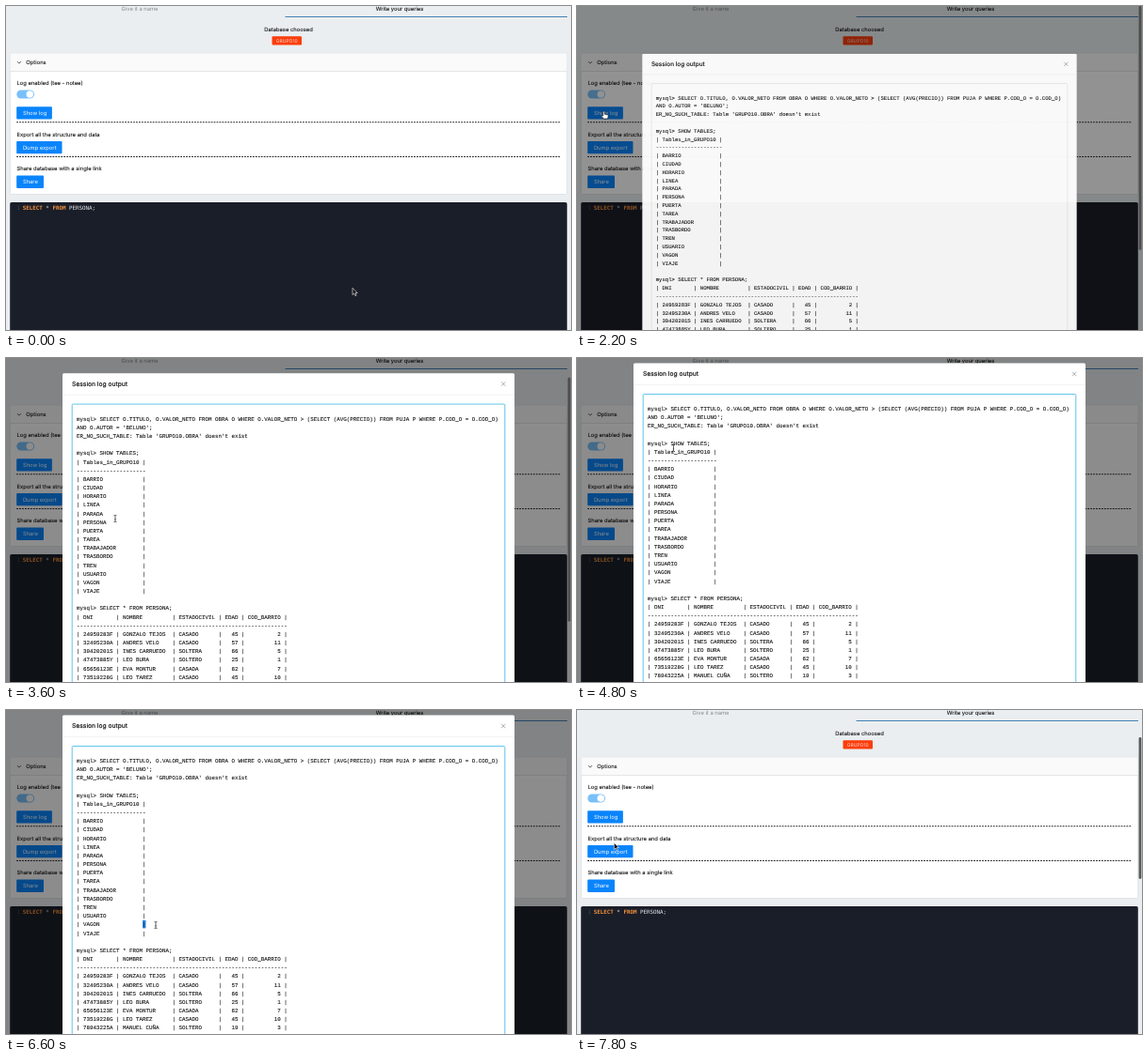
An HTML page for the animation above (8000 ms loop, 600 by 345 pixels).

```html
<!DOCTYPE html>
<html lang="en">
<head>
<meta charset="utf-8">
<title>Session log</title>
<style>
  html, body { margin: 0; width: 100%; height: 100%; overflow: hidden; background: #eaeef0; }
  svg { display: block; width: 600px; height: 345px; }
  text { white-space: pre; text-rendering: geometricPrecision; font: 5.83px Inter, sans-serif; fill: #151515; stroke: #151515; stroke-width: .1; }
  .white { fill: #fff; stroke: none; }
  .grey { fill: #858a8d; stroke: none; }
  .tag { font-size: 5px; fill: #ffe0d6; stroke: none; }
  .title { font-size: 6.67px; font-weight: 500; }
  .log { font-family: "Liberation Mono", "Courier New", monospace; }
  .code { font-family: "DejaVu Sans Mono", monospace; fill: #e6e8ec; stroke: none; }
  .key { fill: #f5923e; font-weight: bold; }
  .num { fill: #3c4352; }
</style>
</head>
<body>
<svg id="stage" viewBox="0 0 600 345" xmlns="http://www.w3.org/2000/svg"></svg>
<script>
const LINE = 9.167;
const STEP = 200, LOOP = 8000;
const MID = 208.4; // the dialog zooms around this height
const stage = document.getElementById('stage');

const rect = (x, y, w, h, fill, more = '') =>
  `<rect x="${x}" y="${y}" width="${w}" height="${h}" fill="${fill}" ${more}/>`;
// y is the middle of the capital letters
const label = (x, y, text, cls = '', anchor = 'start') =>
  `<text x="${x}" y="${y + 2.1}" class="${cls}" text-anchor="${anchor}">${text}</text>`;
const path = (d, stroke, width, more = '') =>
  `<path d="${d}" fill="none" stroke="${stroke}" stroke-width="${width}" ${more}/>`;
const divider = y => path(`M11.2 ${y}H589`, '#1d1d1d', 1.1, 'stroke-dasharray="1.75 1.2"');

const options = [
  ['Show log', 37.7, ''],
  ['Dump export', 48.3, 'Export all the structure and data'],
  ['Share', 28.8, 'Share database with a single link']
];

function option([text, width, heading], i) {
  const y = 107.2 + 36.7 * i;
  return label(11.5, y - 7.4, heading) +
    rect(11.2, y, width, 13.3, '#0a84fb', 'rx=".9"') +
    label(17.9, y + 6.7, text, 'white') +
    (i < 2 ? divider(y + 16.6) : '');
}

function page() {
  return rect(0, 0, 600, 345, '#eaeef0') +
    label(142, 2.6, 'Give it a name', 'grey', 'middle') +
    label(418, 2.6, 'Write your queries', '', 'middle') +
    rect(296.5, 11, 299.5, 1, '#4582b4') +
    label(300, 25.2, 'Database choosed', '', 'middle') +
    rect(282.5, 32.3, 31.5, 9.3, '#fb3d0c', 'rx="1"') +
    label(298.2, 36.8, 'GRUPO10', 'tag', 'middle') +
    rect(4.4, 50.3, 591.3, 150.2, '#fff', 'rx="1.5" stroke="#d5d9db" stroke-width=".6"') +
    rect(4.7, 50.6, 590.7, 19, '#fafafa') +
    rect(4.4, 69.4, 591.3, .6, '#d5d9db') +
    path('M12 59.1l2 2.1 2-2.1', '#222', .7) +
    label(21.3, 60.2, 'Options') +
    label(11.5, 81.6, 'Log enabled (tee - notee)') +
    rect(11.3, 89.4, 18.7, 9.2, '#79c0f9', 'rx="4.6"') +
    '<circle cx="25.3" cy="94" r="3.75" fill="#fff"/>' +
    options.map(option).join('') +
    rect(4.2, 209, 591.6, 140, '#1a1e28', 'rx="1.8"') +
    '<text class="code num" x="11.5" y="217.4">1</text>' +
    '<text class="code" x="17.8" y="217.4"><tspan class="key">SELECT</tspan> * ' +
    '<tspan class="key">FROM</tspan> PERSONA;</text>';
}

const tables = ('BARRIO CIUDAD HORARIO LINEA PARADA PERSONA PUERTA TAREA ' +
  'TRABAJADOR TRASBORDO TREN USUARIO VAGON VIAJE').split(' ');
const people = `24959283F,GONZALO TEJOS,CASADO,45,2
32495230A,ANDRES VELO,CASADO,57,11
39420201S,INES CARRUEDO,SOLTERA,66,5
47473885Y,LEO BURA,SOLTERO,25,1
65656123E,EVA MONTUR,CASADA,62,7
73519228G,LEO TAREZ,CASADO,45,10
78943225A,MANUEL CUÑA,SOLTERO,19,3
79129732X,FERMIN GOLEZ,VIUDO,89,6
79322178Y,TEODOR LUVAS,CASADO,65,12
82713612B,CLARA ENDOSITO,SOLTERA,18,1`.split('\n').map(r => r.split(','));

const row = ([id, name, state, age, area]) =>
  `| ${id.padEnd(9)} | ${name.padEnd(14)} | ${state.padEnd(11)} | ` +
  `${age.padStart(4)} | ${area.padStart(10)} |`;

const lines = [
  '',
  'mysql> SELECT O.TITULO, O.VALOR_NETO FROM OBRA O WHERE O.VALOR_NETO > (SELECT (AVG(PRECIO)) FROM PUJA P WHERE P.COD_O = O.COD_O)',
  "AND O.AUTOR = 'BELUNO';",
  "ER_NO_SUCH_TABLE: Table 'GRUPO10.OBRA' doesn't exist",
  '',
  'mysql> SHOW TABLES;',
  '| Tables_in_GRUPO10 |',
  '-'.repeat(21),
  ...tables.map(n => `| ${n.padEnd(17)} |`),
  '',
  'mysql> SELECT * FROM PERSONA;',
  row(['DNI', 'NOMBRE', 'ESTADOCIVIL', 'EDAD', 'COD_BARRIO']),
  '-'.repeat(64),
  ...people.map(row)
];

// Drawn with its top edge at y = 0
function modal() {
  const escape = s => s.replace(/>/g, '&gt;');
  return rect(60, 0, 480, 407, '#fff', 'rx="1.5"') +
    label(70, 11.3, 'Session log output', 'title') +
    path('M526 9.2l4.4 4.4m0-4.4l-4.4 4.4', '#777', .6) +
    rect(60, 22.7, 480, .5, '#e6e6e6') +
    rect(70.2, 32.9, 459.6, 335.5, '#fff', 'id="area" rx="1"') +
    rect(145, 34.9 + LINE * 20, 3.5, LINE - .6, '#2f86e4', 'id="pick"') +
    lines.map((s, i) =>
      `<text class="log" x="75" y="${41.4 + LINE * i}">${escape(s)}</text>`).join('') +
    path('M525 367l3.5-3.5m-1.5 3.5l1.5-1.5', '#777', .5) +
    label(530, 373, '1,041', 'grey', 'end');
}

const pointers = {
  arrow: '<path d="M0 0V7.2L1.7 5.7 2.9 8.3 4.1 7.8 3 5.2H5.2Z" fill="#111" stroke="#fff" stroke-width=".6"/>',
  hand: '<path d="M-.8 0Q0-1 .8 0V2.6L4 3.3Q4.8 3.6 4.6 4.6L4 7.4H-.4L-2.8 4.4Q-2.8 3.2-.8 4.4Z" fill="#fff" stroke="#111" stroke-width=".6"/>',
  beam: path('M-1.5-3.6Q0-3.6 0-2.8 0-3.6 1.5-3.6M0-2.8V2.8M-1.5 3.6Q0 3.6 0 2.8 0 3.6 1.5 3.6M-.7 .9H.7', '#222', .7)
};

stage.innerHTML = page() +
  rect(0, 0, 600, 345, '#000', 'id="mask"') +
  `<g id="modal">${modal()}</g>` +
  rect(596.6, 0, 2.8, 151, '#484848', 'id="thumb" rx="1.4"') +
  Object.entries(pointers).map(([k, d]) => `<g id="${k}">${d}</g>`).join('');

const set = (id, attrs) => {
  const node = document.getElementById(id);
  for (const k in attrs) node.setAttribute(k, attrs[k]);
};
const ramp = (t, from, to) => Math.min(1, Math.max(0, (t - from) / (to - from)));
const smooth = p => p * p * (3 - 2 * p);

// Pointer journeys: start, end, x, y of arrival
const trips = [
  [0, 400, 221.5, 178.5],
  [600, 1800, 28.6, 112.6],
  [2200, 3400, 116, 171],
  [4200, 4800, 102.5, 96],
  [5400, 6600, 159, 229],
  [6600, 7200, 31.3, 138.3],
  [7400, 7800, 39.3, 141.3]
];

function pointer(t) {
  let x = 368, y = 300.3;
  for (const [from, to, endX, endY] of trips) {
    const p = smooth(ramp(t, from, to));
    x += (endX - x) * p;
    y += (endY - y) * p;
  }
  return [x, y];
}

function draw(ms) {
  const t = Math.floor(ms % LOOP / STEP) * STEP;
  const close = ramp(t, 7200, 7800);
  const zoom = 1 - (1 - ramp(t, 1800, 2405)) ** 3;
  const alpha = (zoom * (1 - close)) ** 1.2;
  const scroll = 37.2 * smooth(ramp(t, 2900, 3980));
  const top = 42.8 - scroll;
  const open = t > 2200 && t < 7200;

  set('mask', { opacity: .45 * alpha });
  set('modal', {
    opacity: alpha,
    transform: `translate(300 ${top + MID}) scale(${zoom * (1 - .75 * close)}) translate(-300 ${-MID})`
  });
  const focus = open && t >= 3200;
  set('area', { stroke: focus ? '#62c3ec' : '#d6d6d6', 'stroke-width': focus ? 1 : .5 });
  set('pick', { opacity: open && t >= 6400 ? 1 : 0 });

  // The dialog's scrollbar gives way to the page's once it has closed
  const inDialog = close < 1;
  set('thumb', {
    y: inDialog ? scroll * .78 : 29,
    height: inDialog ? 260 : 151,
    opacity: t >= 2000 && t <= 4000 || close > 0 ? .9 : 0
  });

  const [x, y] = pointer(t);
  const shape = open && x > 70 ? 'beam' : t <= 2200 && x < 49 ? 'hand' : 'arrow';
  for (const k in pointers)
    set(k, { transform: `translate(${x} ${y})`, visibility: k === shape ? 'visible' : 'hidden' });
}

const start = performance.now();
function tick() {
  draw(performance.now() - start);
  requestAnimationFrame(tick);
}
tick();
</script>
</body>
</html>
```
